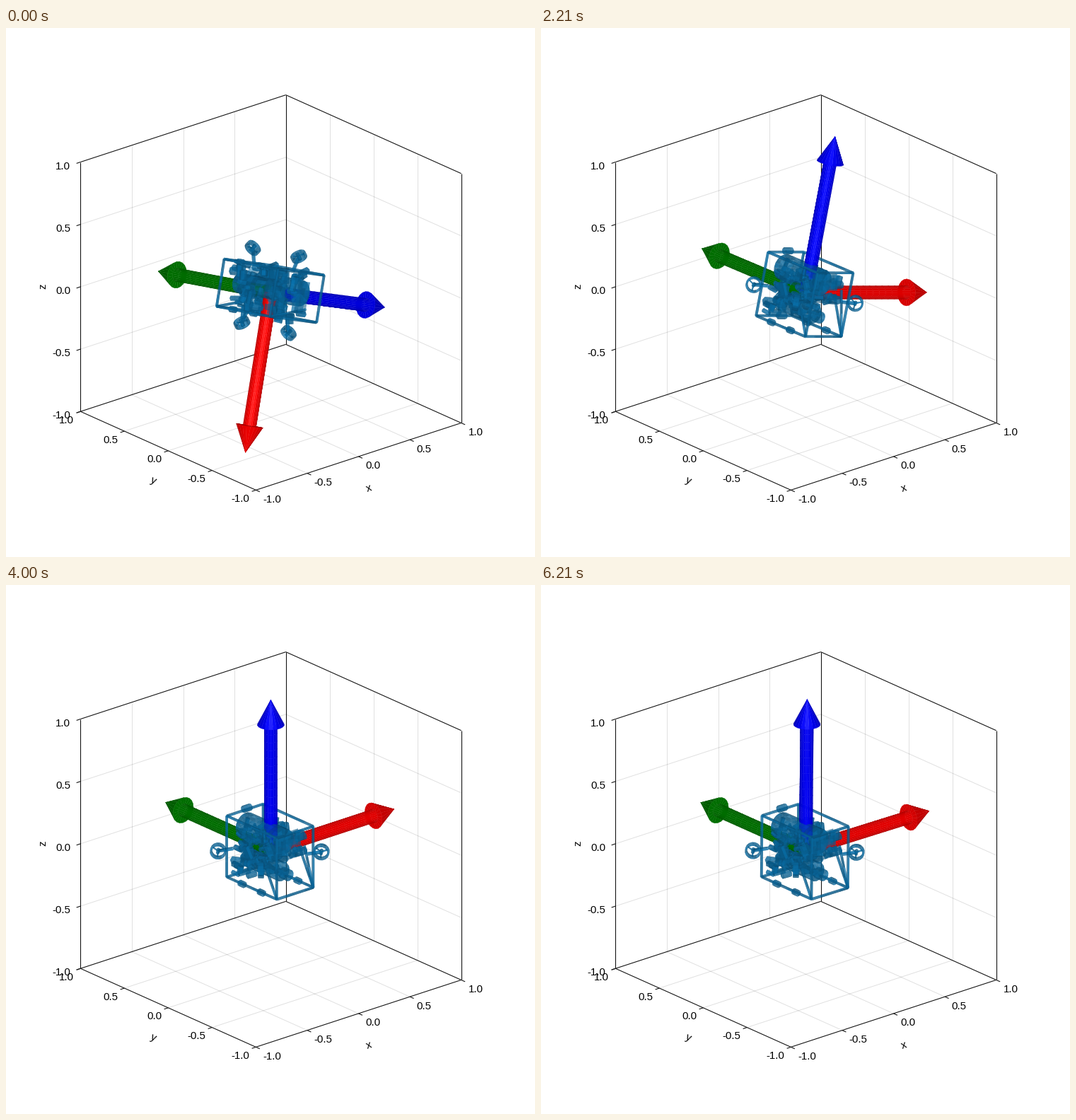
A matplotlib script for the animation above (6250 ms loop, 748x748 px).

```python
import numpy as np
import matplotlib.pyplot as plt
from matplotlib.animation import FuncAnimation
from matplotlib.collections import LineCollection, PolyCollection

W, DPI = 748, 100
FRAMES, LOOP = 150, 6250
PX = 72 / DPI
CX, CY, SCALE = 374.5, 374, 190.9
AZ, EL = 1.275 * np.pi, np.pi / 8
VIEW = np.array([
    [-np.sin(AZ), np.cos(AZ), 0],
    [-np.sin(EL) * np.cos(AZ), -np.sin(EL) * np.sin(AZ), np.cos(EL)],
    [np.cos(EL) * np.cos(AZ), np.cos(EL) * np.sin(AZ), np.sin(EL)],
])
SPIN = np.array([-0.087, 0.989, -0.05])
SPIN /= np.linalg.norm(SPIN)
rng = np.random.default_rng(4)


def to_screen(v):
    return np.stack([CX + SCALE * v[..., 0], CY - SCALE * v[..., 1]], -1)


def project(*p):
    return to_screen(VIEW @ np.array(p, float))


# ---------- geometry: every face is a quad ----------
def quads(g):
    faces = np.stack([g[:-1, :-1], g[:-1, 1:], g[1:, 1:], g[1:, :-1]], 2)
    return faces.reshape(-1, 4, 3)


def lathe(p, axis, profile, n=12):
    """Surface of revolution; profile holds (distance, radius) pairs."""
    w = np.array(axis, float)
    w /= np.linalg.norm(w)
    a = np.cross(w, [0.3, 0.5, 0.81])
    a /= np.linalg.norm(a)
    b = np.cross(w, a)
    ang = np.linspace(0, 2 * np.pi, n + 1)[:, None]
    ring = np.cos(ang) * a + np.sin(ang) * b
    d, r = np.array(profile, float).T[:, :, None, None]
    return quads(np.array(p) + d * w + r * ring)


def bar(p, q, r=0.0105, n=5, m=4):
    p, q = np.array(p, float), np.array(q, float)
    size = np.linalg.norm(q - p)
    return lathe(p, q - p, [(d, r) for d in np.linspace(0, size, m + 1)], n)


def drum(p, axis, size, r, n=14, m=6):
    side = [(d, r) for d in np.linspace(0, size, m + 1)]
    return lathe(p, axis, [(0, 0), *side, (size, 0)], n)


def plate(p, u, v, nu=5, nv=3):
    i = np.linspace(0, 1, nu + 1)[:, None, None]
    j = np.linspace(0, 1, nv + 1)[None, :, None]
    return quads(np.array(p) + i * np.array(u) + j * np.array(v))


def arrow(axis):
    shaft = [(d, 0.049) for d in np.linspace(0, 1, 17)]
    return lathe((0, 0, 0), axis, [(0, 0), *shaft, (1, 0.1), (1.2, 0)], 20)


def thruster(x, y):
    axis = np.array([1, 1 if x * y < 0 else -1, 0]) / np.sqrt(2)
    side = np.array([axis[1], -axis[0], 0])
    c = np.array([x, y, -0.01])
    hoop = [(-0.02, 0.046), (-0.02, 0.06), (0.02, 0.06), (0.02, 0.046), (-0.02, 0.046)]
    parts = [lathe(c, axis, hoop, 16), drum(c - 0.03 * axis, axis, 0.06, 0.014, 8, 1)]
    for k in range(3):
        t = 0.4 + k * 2 * np.pi / 3
        tip = c + 0.05 * (np.cos(t) * side + np.sin(t) * np.array([0, 0, 1]))
        parts.append(bar(c, tip, 0.006, 4, 1))
    parts.append(bar(c, (0.62 * x, 0.85 * y, -0.01), 0.014, 5, 2))
    return parts


def fittings(count):
    """Small housings and cabling packed between the hulls."""
    parts = []
    while len(parts) < count:
        p = rng.uniform([-0.2, -0.2, -0.21], [0.15, 0.24, 0.13])
        if p[1] + p[2] < -0.18:
            continue
        axis = np.eye(3)[rng.integers(3)] + rng.normal(0, 0.15, 3)
        parts.append(drum(p, axis, rng.uniform(0.04, 0.1), rng.uniform(0.014, 0.034), 6, 1))
    return parts


def vehicle():
    x0, x1, y0, y1, z0, z1 = -0.19, 0.165, -0.29, 0.28, -0.258, 0.232
    parts = []
    for x in (x0, x1):
        for y in (y0, y1):
            parts.append(bar((x, y, z0), (x, y, z1)))
        for z in (z0, z1):
            parts.append(bar((x, y0, z), (x, y1, z), m=6))
        parts.append(bar((x, y0, z0), (x, -0.13, 0.02)))
        for y in (0.08, -0.14):
            parts.append(drum((x, y, z0), (0, 1, 0), 0.05, 0.025, 8, 1))
    for y in (y0, y1):
        for z in (z0, z1):
            parts.append(bar((x0, y, z), (x1, y, z)))
        parts.append(bar((x1, y, z0), (0.08, y, 0.1)))
    parts.append(drum((-0.03, y1, z1 + 0.01), (1, 0, 0), 0.07, 0.027, 8, 1))
    # pressure hulls, front panel, deck
    parts.append(drum((-0.03, 0.25, 0.125), (0, -1, 0), 0.43, 0.1, 18, 10))
    parts.append(drum((-0.03, 0.22, -0.12), (0, -1, 0), 0.38, 0.075, 16, 8))
    parts.append(drum((-0.02, -0.16, -0.13), (0, -1, 0), 0.07, 0.045, 12, 2))
    parts.append(plate((-0.12, -0.2, 0.07), (0.24, 0, 0), (0, 0, 0.12)))
    parts.append(plate((-0.12, -0.17, 0.07), (0.24, 0, 0), (0, 0, 0.12)))
    parts.append(plate((-0.16, 0.24, -0.03), (0.32, 0, 0), (0, -0.42, 0), 6, 8))
    for x, y in ((-0.3, 0.25), (-0.3, -0.24), (0.26, 0.24), (0.27, -0.26)):
        parts += thruster(x, y)
    return np.concatenate(parts + fittings(110))


arrows = [arrow(v) for v in np.eye(3)]
body = vehicle()
solid = sum(len(a) for a in arrows)
mesh = np.concatenate([*arrows, body])
hue = np.concatenate([
    np.repeat([[1, 0, 0], [0, 0.5, 0], [0, 0, 1]], [len(a) for a in arrows], axis=0),
    np.tile([0.0, 0.447, 0.698], (len(body), 1)),
])
grain = rng.uniform(0.74, 1.04, len(body))
alpha = np.concatenate([np.ones(solid), rng.uniform(0.5, 0.72, len(body))])
opaque = np.arange(len(mesh)) < solid


# ---------- motion ----------
def angle(t):
    """Swing about SPIN in degrees: speed up, steady turn, damped ringing."""
    t1, t2, rate = 1.38, 2.433, 66.0
    if t < t1:
        s = t / t1
        return (111 * (1 - 3 * s**2 + 2 * s**3) - 14 * t1 * (s - 2 * s**2 + s**3)
                + 69.5 * (3 * s**2 - 2 * s**3) - rate * t1 * (s**3 - s**2))
    if t < t2:
        return rate * (t2 - t)
    tau = t - t2
    s = np.clip(t - 5.2, 0, 1)
    return -11 * np.exp(-1.2 * tau) * np.sin(6 * tau) + 0.58 * s * s * (3 - 2 * s)


def rotation(deg):
    a = np.radians(deg)
    x, y, z = SPIN
    k = np.array([[0, -z, y], [z, 0, -x], [-y, x, 0]])
    return np.eye(3) + np.sin(a) * k + (1 - np.cos(a)) * k @ k


# ---------- static axes ----------
fig = plt.figure(figsize=(W / DPI, W / DPI), dpi=DPI, facecolor="white")
ax = fig.add_axes([0, 0, 1, 1])
ax.set(xlim=(0, W), ylim=(W, 0))
ax.axis("off")


def lines(segs, color, width):
    ax.add_collection(LineCollection(segs, colors=color, linewidths=width * PX, zorder=1))


def label(x, y, s, **kw):
    ax.text(x, y, s, family="Liberation Sans", size=15 * PX, color="black", **kw)


grid = []
for v in (-0.5, 0, 0.5):
    grid += [(project(v, 1, -1), project(v, 1, 1)), (project(1, v, -1), project(1, v, 1)),
             (project(v, -1, -1), project(v, 1, -1)), (project(-1, v, -1), project(1, v, -1)),
             (project(-1, 1, v), project(1, 1, v)), (project(1, -1, v), project(1, 1, v))]
lines(grid, (0, 0, 0, 0.12), 1)

box = []
for z in (-1, 1):
    box += [(project(-1, 1, z), project(1, 1, z)), (project(1, -1, z), project(1, 1, z))]
box += [(project(-1, -1, -1), project(-1, 1, -1)), (project(-1, -1, -1), project(1, -1, -1))]
box += [(project(x, y, -1), project(x, y, 1)) for x, y in ((-1, 1), (1, 1), (1, -1))]
lines(box, (0.08, 0.08, 0.08), 1.1)

ticks = []
for v in (-1, -0.5, 0, 0.5, 1):
    for p, step, dx, dy, ha in ((project(v, -1, -1), (5.5, 2.4), 9.8, 17.4, "left"),
                                (project(-1, v, -1), (-5.7, 1.9), -9.3, 16.6, "right"),
                                (project(-1, 1, v), (-5.7, 1.9), -14, 10, "right")):
        ticks.append((p, p + step))
        label(p[0] + dx, p[1] + dy, f"{v:.1f}", ha=ha, va="baseline")
lines(ticks, (0.08, 0.08, 0.08), 1.1)
for x, y, s, rot in ((513.5, 651, "x", 18), (208.5, 640, "y", -24), (52, 365, "z", 90)):
    label(x, y, s, rotation=rot, rotation_mode="anchor", ha="center", va="center")

model = PolyCollection([], zorder=3, joinstyle="round")
ax.add_collection(model)


def draw(i):
    v = mesh @ (VIEW @ rotation(angle(i * LOOP / FRAMES / 1000))).T
    normal = np.cross(v[:, 2] - v[:, 0], v[:, 3] - v[:, 1])
    facing = normal[:, 2] / (np.linalg.norm(normal, axis=1) + 1e-12)
    lit = np.abs(facing)
    shade = 0.62 + 0.33 * lit
    shade[solid:] = (0.6 + 0.36 * lit[solid:]) * grain
    gloss = np.where(opaque, 0.14 * lit**24, 0.03)
    rgb = np.clip(hue * shade[:, None] + gloss[:, None], 0, 1)
    face = np.column_stack([rgb, alpha])
    edge = np.column_stack([rgb, opaque])

    order = np.argsort(v[:, :, 2].mean(1))
    order = order[~opaque[order] | (facing[order] > 0)]
    model.set_verts(to_screen(v[order]))
    model.set_facecolor(face[order])
    model.set_edgecolor(edge[order])
    model.set_linewidth(np.where(opaque[order], 0.35 * PX, 0))
    return [model]


anim = FuncAnimation(fig, draw, frames=FRAMES, interval=LOOP / FRAMES,
                     repeat=True, repeat_delay=0, blit=False)
plt.show()
```
